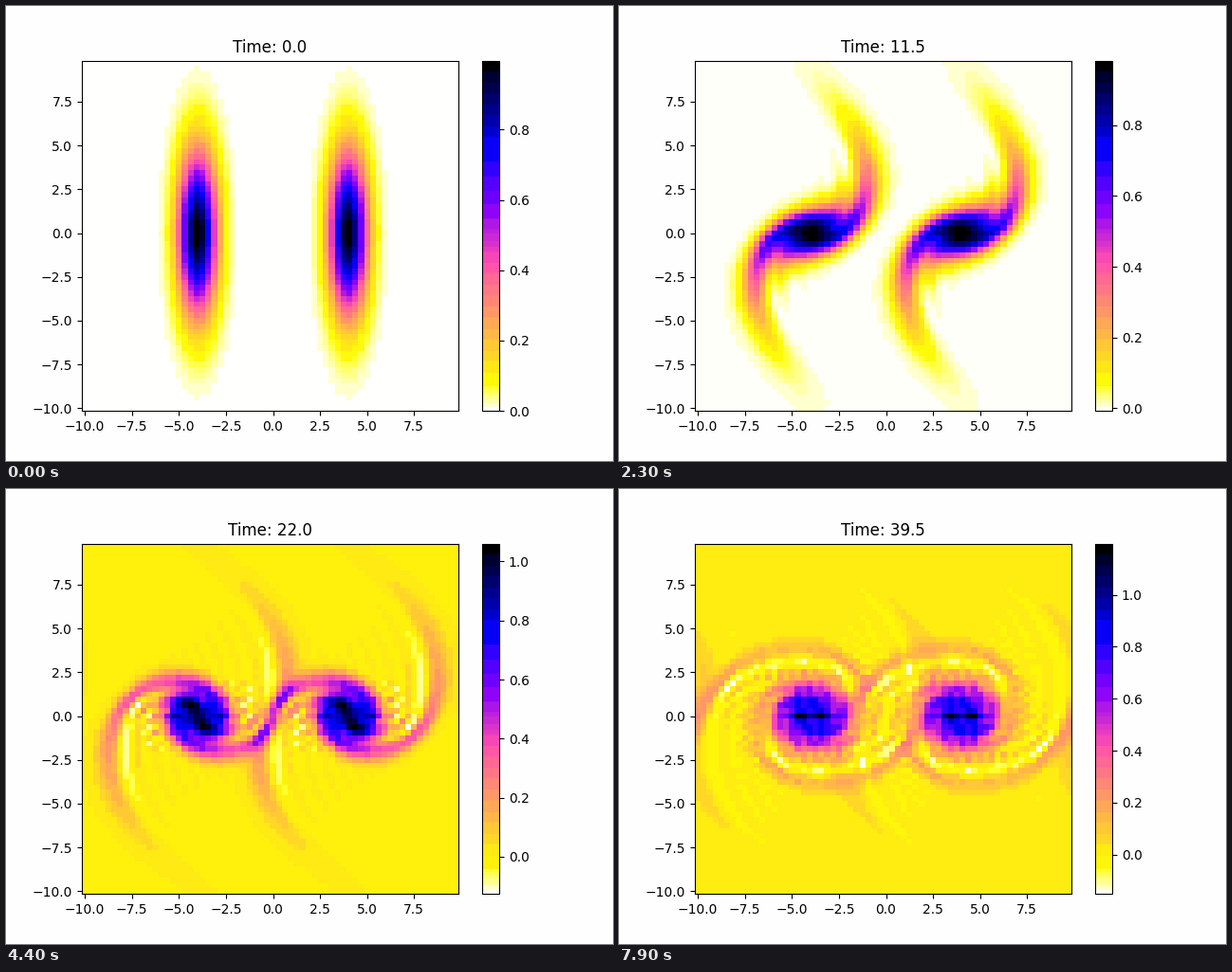
These frames come from a looping animation (640x480 px, 8000 ms). A matplotlib script:

```python
import matplotlib.pyplot as plt
import numpy as np
from matplotlib.animation import FuncAnimation
from matplotlib.colors import ListedColormap

N, SPAN, NU = 64, 20.0, 0.001
FRAMES, DT, SUBSTEPS = 80, 0.5, 5
H = SPAN / N
PAGE = "#fefefe"

grid = -SPAN / 2 + H * np.arange(N)
X, Y = np.meshgrid(grid, grid)

k = 2 * np.pi * np.fft.fftfreq(N, H)
K2 = k[:, None] ** 2 + k[None, :] ** 2
K2[0, 0] = np.inf  # zero-mean stream function


def ddx(f):
    return (np.roll(f, -1, -1) - np.roll(f, 1, -1)) / (2 * H)


def ddy(f):
    return (np.roll(f, -1, -2) - np.roll(f, 1, -2)) / (2 * H)


def laplacian(f):
    around = sum(np.roll(f, s, a) for s in (-1, 1) for a in (-2, -1))
    return (around - 4 * f) / H**2


def rate(w):
    """Vorticity equation with centred differences and an FFT Poisson solve."""
    psi = np.fft.ifft2(-np.fft.fft2(w) / K2).real
    return ddx(psi) * ddy(w) - ddy(psi) * ddx(w) + NU * laplacian(w)


def rk4(w, dt):
    a = rate(w)
    b = rate(w + dt / 2 * a)
    c = rate(w + dt / 2 * b)
    d = rate(w + dt * c)
    return w + dt / 6 * (a + 2 * b + 2 * c + d)


def simulate():
    """Two vortices that evolve independently and are shown as their sum."""
    pair = np.array([np.exp(-((X - x0) ** 2) - Y**2 / 20) for x0 in (-4, 4)])
    fields = [pair.sum(0)]
    for _ in range(FRAMES - 1):
        for _ in range(SUBSTEPS):
            pair = rk4(pair, DT / SUBSTEPS)
        fields.append(pair.sum(0))
    return fields


BASE = (plt.get_cmap("gnuplot2_r")(np.arange(256))[:, :3] * 255).astype(int)
BUCKET = np.unique((BASE >> [5, 4, 5]) @ [128, 8, 1], return_inverse=True)[1].ravel()


def banded_cmap(w):
    """Merge similar colours, each band weighted by the area it covers."""
    level = ((w - w.min()) / np.ptp(w) * 256).astype(int).clip(0, 255)
    area = 36.0 * np.bincount(level.ravel(), minlength=256) + 27
    area[0] += 150000   # white page
    area[-1] += 3000    # black text and lines
    total = np.bincount(BUCKET, area)
    mean = [np.bincount(BUCKET, area * BASE[:, c]) / total for c in range(3)]
    rgb = np.floor(np.array(mean).T + 1e-6)[BUCKET]
    return ListedColormap(rgb / 255)


fields = simulate()

plt.rcParams["font.family"] = "DejaVu Sans"
fig, ax = plt.subplots(figsize=(6.4, 4.8), dpi=100, facecolor=PAGE)
mesh = ax.pcolormesh(grid, grid, fields[0], cmap=banded_cmap(fields[0]), shading="nearest")
fig.colorbar(mesh, ax=ax)
title = ax.set_title("Time: 0.0")


def update(i):
    w = fields[i]
    mesh.set_array(w)
    mesh.set_cmap(banded_cmap(w))
    mesh.set_clim(w.min(), w.max())
    title.set_text(f"Time: {i * DT:.1f}")
    return mesh, title


anim = FuncAnimation(fig, update, frames=FRAMES, interval=100, repeat=True,
                     repeat_delay=0, blit=False)
plt.show()
```
